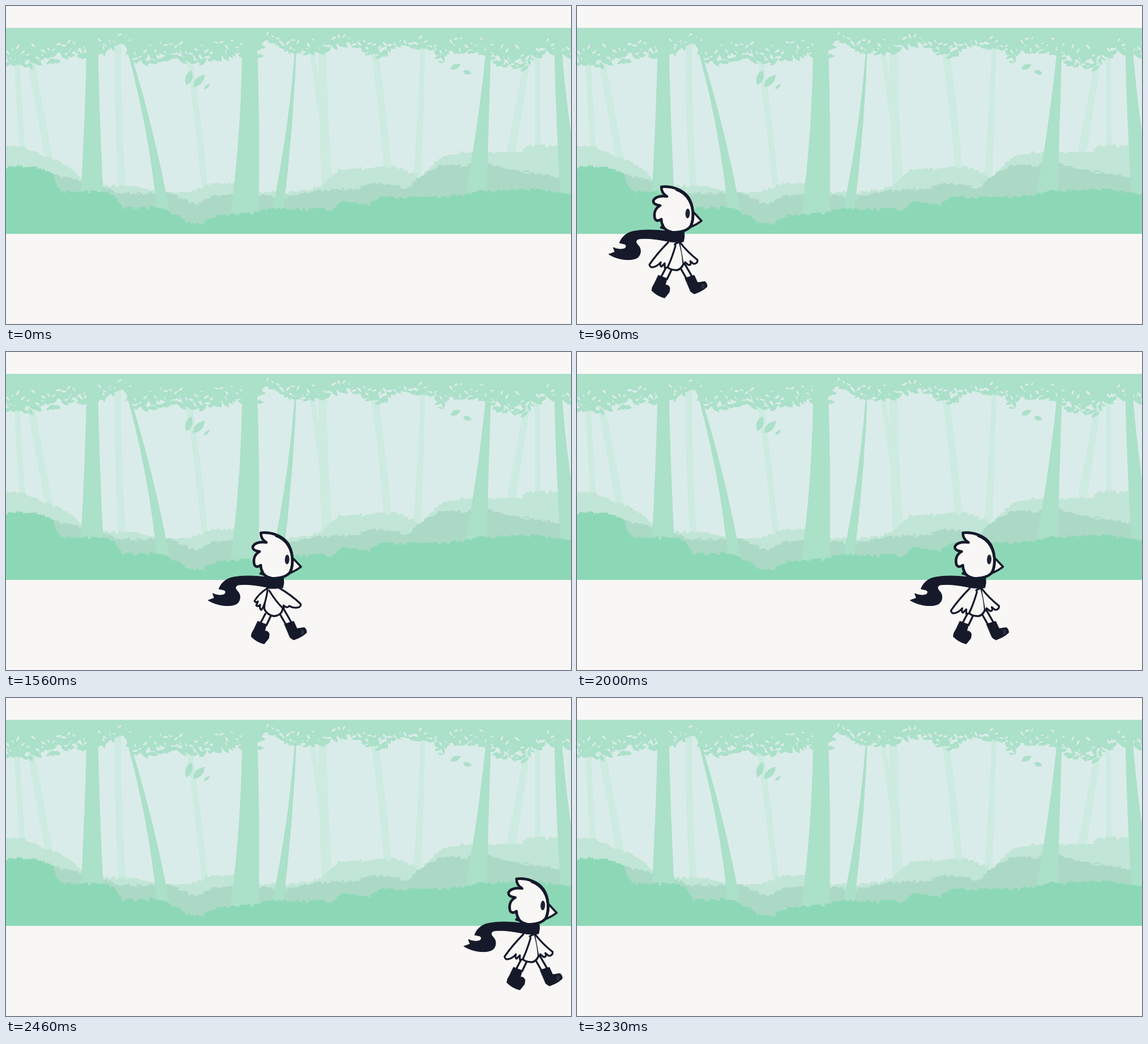
Animation of 998x561 px, one loop 3330 ms. Source, as an HTML page with a canvas:

```html
<!DOCTYPE html>
<html lang="en">
<head>
<meta charset="utf-8">
<title>Forest walk</title>
<style>
html, body { margin: 0; width: 100%; height: 100%; overflow: hidden; background: #f8f7f5; }
canvas { display: block; }
</style>
</head>
<body>
<canvas id="stage" width="998" height="561"></canvas>
<script>
const W = 998, H = 561, LOOP = 3330, FRAMES = 100;
const TOP = 38.5, GROUND = 402;
const PAPER = '#f8f7f5', SKY = '#daece9', INK = '#15192a';
const PALE = '#cdebe0', FAR = '#c1e5d6', MID = '#acd9c6', TRUNK = '#abe0c9', NEAR = '#8cd8b6';

const ctx = document.getElementById('stage').getContext('2d');
const scene = document.createElement('canvas');
scene.width = W;
scene.height = H;
const bg = scene.getContext('2d');

let seed = 7;
function rnd(a = 0, b = 1) {
  seed = (seed * 1664525 + 1013904223) % 4294967296;
  return a + (b - a) * seed / 4294967296;
}

// Turns "x,y x,y ..." into a height function.
function profile(text) {
  const pts = text.split(' ').map(p => p.split(',').map(Number));
  return x => {
    let i = 1;
    while (i < pts.length - 1 && pts[i][0] < x) i++;
    const [x0, y0] = pts[i - 1], [x1, y1] = pts[i];
    const t = Math.min(1, Math.max(0, (x - x0) / (x1 - x0)));
    return y0 + (y1 - y0) * t;
  };
}

function dot(x, y, r) {
  bg.beginPath();
  bg.arc(x, y, r, 0, 7);
  bg.fill();
}

function leaf(x, y, len, wide, angle) {
  bg.save();
  bg.translate(x, y);
  bg.rotate(angle);
  bg.beginPath();
  bg.moveTo(-len, 0);
  bg.quadraticCurveTo(-len * 0.1, -wide * 2, len, 0);
  bg.quadraticCurveTo(-len * 0.1, wide * 2, -len, 0);
  bg.fill();
  bg.restore();
}

// A stem from (x0, y0) to (x1, y1) that flares at the foot and bows sideways.
function trunk(x0, w0, x1, w1, bow, y0, y1) {
  const xm = (x0 + x1) / 2 + 2 * bow, ym = (y0 + y1) / 2;
  const wm = w0 + (w1 - w0) / 4;
  bg.beginPath();
  bg.moveTo(x0 - w0 / 2, y0);
  bg.quadraticCurveTo(xm - wm / 2, ym, x1 - w1 / 2, y1);
  bg.lineTo(x1 + w1 / 2, y1);
  bg.quadraticCurveTo(xm + wm / 2, ym, x0 + w0 / 2, y0);
  bg.fill();
}

// A shrub bank: columns topped with round tufts and a few loose leaves.
function bushes(color, from, text) {
  const top = profile(text);
  bg.fillStyle = color;
  for (let x = from; x < W + 4; x += 2) {
    const y = top(x);
    bg.fillRect(x, y + 3, 2.5, GROUND - y);
    if (rnd() < 0.55) {
      const r = rnd(2.5, 5);
      dot(x, y + r + rnd(-2.5, 1.5), r);
    }
    if (rnd() < 0.04) leaf(x, y - 1, 4, 1.5, rnd(-1, 1));
  }
}

function canopy(text) {
  const low = profile(text);
  const at = (x, share) => TOP + (low(x) - TOP) * share;
  bg.fillStyle = TRUNK;
  bg.beginPath();
  bg.moveTo(0, TOP);
  for (let x = 0; x <= W + 4; x += 4) bg.lineTo(x, at(x, rnd(0.66, 0.88)));
  bg.lineTo(W, TOP);
  bg.fill();
  for (let x = 0; x < W; x += 4) {
    const len = rnd(5, 10);
    leaf(x, at(x, rnd(0.7, 0.97)), len, len * rnd(0.3, 0.5), rnd(-0.9, 1.4));
  }
  bg.fillStyle = SKY;
  for (let x = 3; x < W; x += 9) {
    const len = rnd(2.5, 6);
    leaf(x, at(x, rnd(0.4, 0.85)), len, len * 0.35, rnd(-1.2, 1.2));
  }
}

function drawScene() {
  bg.fillStyle = PAPER;
  bg.fillRect(0, 0, W, H);
  bg.save();
  bg.beginPath();
  bg.rect(0, TOP, W, GROUND - TOP);
  bg.clip();
  bg.fillStyle = SKY;
  bg.fillRect(0, TOP - 1, W, H);

  bg.fillStyle = PALE;
  for (const t of [
    [17, 10, 33, 11, 0], [37, 13, 87, 14, 0], [198, 11, 206, 13, -3], [319, 11, 352, 11, 2],
    [537, 9, 573, 10, 2], [559, 14, 568, 20, -2], [648, 13, 677, 14, 3], [737, 8, 725, 16, 1],
    [926, 10, 879, 20, 1], [938, 8, 940, 12, 0]
  ]) trunk(...t, 60, 330);

  bushes(FAR, 0, '0,248 30,249 95,276 150,314 240,320 270,330 320,330 365,314 415,314 445,330 ' +
    '530,326 560,317 590,289 690,284 733,303 765,270 800,259 905,259 922,247 998,246');
  bushes(MID, 82, '80,297 125,308 200,330 290,331 335,351 365,336 440,331 485,339 560,325 620,323 ' +
    '650,313 708,320 732,302 765,283 850,278 890,290 950,296 998,310');

  canopy('0,104 25,112 80,104 110,89 160,93 205,62 230,110 300,93 325,108 390,94 450,92 457,57 ' +
    '520,92 600,68 655,94 700,72 755,77 768,106 790,80 850,86 872,112 914,117 945,86 998,92');

  bg.fillStyle = TRUNK;
  for (const t of [
    [152.5, 19, 152, 44, 0], [208, 4, 279, 23, 7], [430, 26, 421, 50, 4],
    [513, 2, 478, 21, 5], [854, 7, 826, 44, 2], [974, 12, 1003, 42, -4]
  ]) trunk(...t, 50, 372);
  leaf(323, 127, 14, 6, 1.9);
  leaf(341, 132, 15, 6, -0.8);
  leaf(355, 142, 7, 2.6, -0.7);
  leaf(815, 117, 8, 4, 0.3);
  leaf(794, 107, 10, 4.5, -0.4);

  bushes(NEAR, 0, '0,284 50,284 80,295 95,328 170,327 190,335 205,356 265,355 305,369 318,384 350,384 ' +
    '362,371 440,365 460,359 580,358 592,346 640,350 660,337 720,337 780,337 840,327 925,323 998,333');
  bg.restore();
}

const shape = s => new Path2D(s);

const bird = {
  legs: shape('M157 462 L148 479 L159 482 L168 463 M182 461 L194 482 L203 477 L191 456'),
  boots: shape('M144 475 L159 481 L156 492 Q163 492 164 498 L163 505 L155 515 Q142 512 132 502 Q132 496 137 489Z' +
    'M191 480 L207 475 L213 488 L226 486 Q230 489 230 495 Q222 503 207 508 L201 504Z'),
  head: shape('M149 319 C165 317 187 323 197 338 C206 352 207 374 201 388 C195 397 180 400 168 399 ' +
    'C159 397 154 394 152 388 Q149 383 149 376 C144 380 138 380 137 372 C136 364 139 356 147 352 ' +
    'C140 351 134 349 135 343 C138 337 148 334 159 336 C152 332 149 325 149 319Z'),
  cheek: shape('M176 324 C196 331 205 350 205 369 Q205 382 200 390'),
  nape: shape('M152 386 L148 391 L157 394'),
  beak: shape('M207 365 L220 379 Q212 385 203 389'),
  scarf: shape('M189 397 Q191 407 188 416 Q177 418 164 416 C140 411 122 409 109 411 Q101 414 107 421 ' +
    'C114 427 114 438 107 444 C97 450 74 449 56 438 L67 434 L64 426 Q75 431 84 428 Q90 423 84 420 L75 418 ' +
    'C79 407 88 399 102 397 C125 393 150 396 165 398Z')
};

const poses = [
  {
    body: shape('M161 416 Q156 436 155 453 Q160 464 172 466 Q184 465 187 456 L189 447 L181 416Z'),
    wings: [
      shape('M160 417 Q145 427 138 439 Q139 443 144 440 L141 447 Q144 450 148 446 Q146 453 150 455 Q157 446 161 420Z'),
      shape('M164 421 Q176 441 190 454 L189 447 Q196 453 199 448 Q208 453 217 450 Q221 447 219 444 Q202 428 181 416')
    ]
  },
  {
    body: shape('M173 420 Q167 444 160 461 Q166 466 176 466 Q184 465 188 455 Q187 435 181 416Z'),
    wings: [
      shape('M161 417 Q142 436 128 456 Q129 463 137 460 Q143 458 148 452 Q146 459 149 460 L155 454 L155 462 L160 461 Q168 444 174 423'),
      shape('M182 417 Q195 434 213 448 Q213 455 206 455 L200 450 Q203 457 197 457 L191 452 L189 456')
    ]
  }
];

function ink(path, width, fill) {
  if (fill) {
    ctx.fillStyle = fill;
    ctx.fill(path);
  }
  ctx.lineWidth = width;
  ctx.stroke(path);
}

function drawBird(x, pose) {
  ctx.save();
  ctx.translate(x, 0);
  ctx.strokeStyle = INK;
  ctx.lineJoin = ctx.lineCap = 'round';
  ink(bird.legs, 3.4, PAPER);
  ink(pose.body, 3.4, PAPER);
  for (const w of pose.wings) ink(w, 3.2, PAPER);
  ink(bird.boots, 1, INK);
  ctx.fillStyle = '#2c3040';
  ctx.fillRect(220, 490, 5, 8);
  ink(bird.beak, 3.6, PAPER);
  ink(bird.head, 4.6, PAPER);
  ink(bird.cheek, 4.6);
  ink(bird.nape, 3);
  ctx.fillStyle = '#1f2333';
  ctx.beginPath();
  ctx.ellipse(195.5, 366, 4, 8.5, 0.05, 0, 7);
  ctx.fill();
  ink(bird.scarf, 1, INK);
  ctx.restore();
}

// Eased crossing, given as the place of the front toe.
function toeAt(frame) {
  const u = frame / FRAMES;
  return -8.5 + 1187 * u * u * (3 - 2 * u) - 3.2 * Math.sin(2 * Math.PI * u);
}

function render() {
  const t = performance.now() % LOOP;
  const frame = Math.floor((Math.floor(t / 10) * 10 + 9.9) * 0.03);
  ctx.drawImage(scene, 0, 0);
  if (frame >= 5 && frame < 97) {
    drawBird(toeAt(frame) - 230, poses[(frame + 2) % 8 < 4 ? 0 : 1]);
  }
  requestAnimationFrame(render);
}

drawScene();
render();
</script>
</body>
</html>
```
